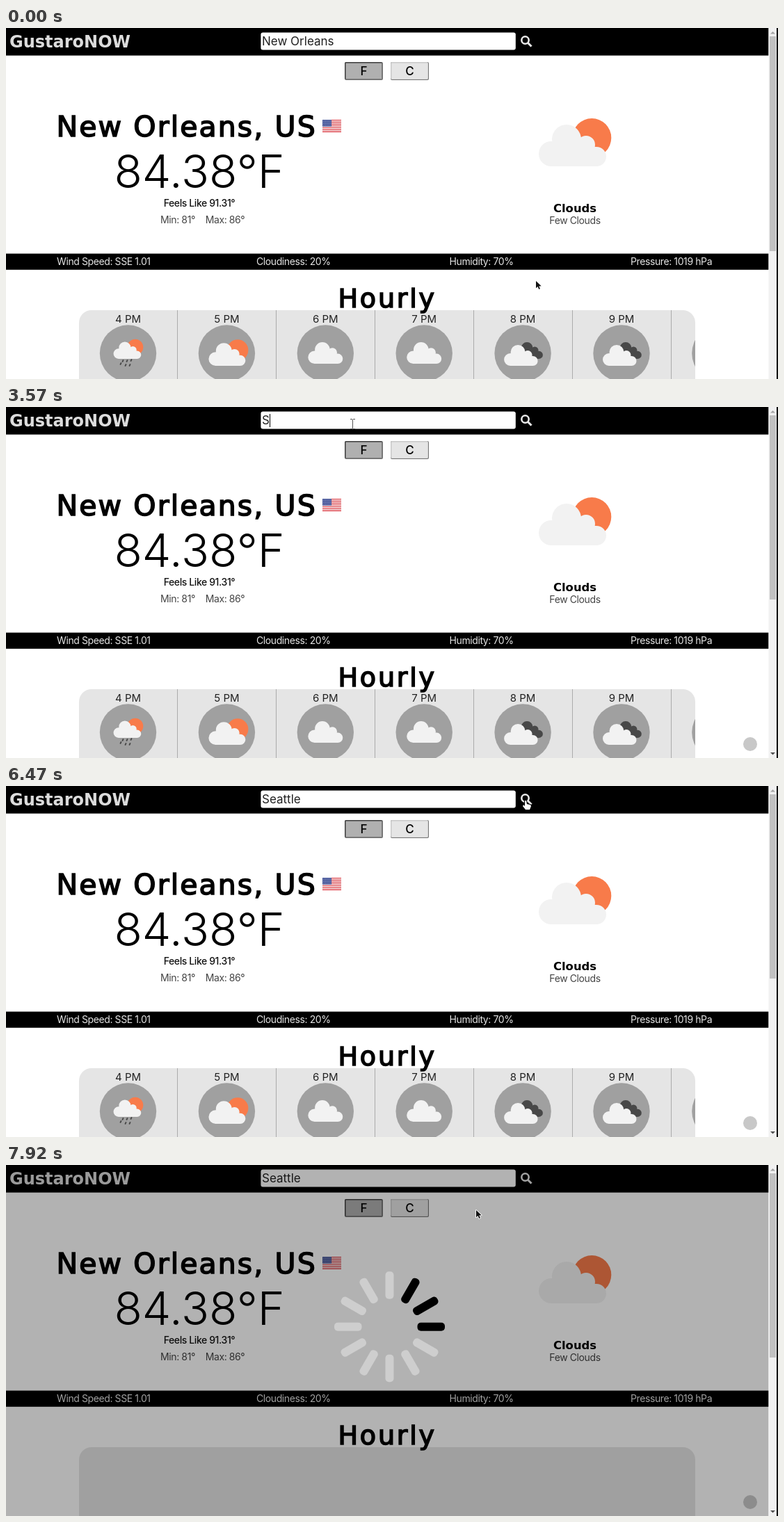
These frames come from a looping animation (1110x505 px, 8 s). An HTML page with a canvas:

```html
<!DOCTYPE html>
<html lang="en">
<head>
<meta charset="utf-8">
<title>Weather search</title>
<style>
html, body { margin: 0; width: 100%; height: 100%; overflow: hidden; background: #fff; }
canvas { display: block; }
</style>
</head>
<body>
<canvas id="stage" width="1110" height="505"></canvas>
<script>
const ctx = document.getElementById('stage').getContext('2d');
const LOOP = 8000;
const BODY = 'Inter, "Open Sans", sans-serif';
const DISPLAY = '"DejaVu Sans", sans-serif';
const ORANGE = '#f87b4a', CLOUD = '#f2f2f2', DARK = '#484848';
const PAGE_WIDTH = 1096.5;

const DIMMED = 6680;
const SPINNER_ON = 6780;
const POINTER_HIDDEN = [4750, 5530];
const CARET_ON = [[1860, 2250], [3570, 5340], [5830, 6360]];
const TYPING = [3570, 3640, 3850, 4240, 4440, 4650, 4840];

// Each move: start, end, step count, target x, target y, sag of the path
const START = [762, 364];
const MOVES = [
  [120, 890, 9, 465, 49, 0],
  [990, 1180, 3, 432, 31, 0],
  [1470, 1860, 5, 501, 24, 0],
  [2850, 2960, 2, 498, 24, 0],
  [5530, 6270, 9, 745, 25, 31],
  [6360, 6470, 2, 748, 21, 0],
  [7020, 7420, 5, 728, 45, 0],
  [7520, 7920, 5, 676, 65, 0]
];

const within = (t, [a, b]) => t >= a && t < b;

function rect(x, y, w, h, color) {
  ctx.fillStyle = color;
  ctx.fillRect(x, y, w, h);
}

function round(x, y, w, h, r, color) {
  ctx.fillStyle = color;
  ctx.beginPath();
  ctx.roundRect(x, y, w, h, r);
  ctx.fill();
}

function disc(x, y, r, color) {
  ctx.fillStyle = color;
  ctx.beginPath();
  ctx.arc(x, y, r, 0, Math.PI * 2);
  ctx.fill();
}

function line(x1, y1, x2, y2, color, width) {
  ctx.strokeStyle = color;
  ctx.lineWidth = width;
  ctx.beginPath();
  ctx.moveTo(x1, y1);
  ctx.lineTo(x2, y2);
  ctx.stroke();
}

function polygon(points, fill, stroke) {
  ctx.beginPath();
  points.forEach(([x, y]) => ctx.lineTo(x, y));
  ctx.closePath();
  if (stroke) {
    ctx.strokeStyle = stroke;
    ctx.lineWidth = 2;
    ctx.lineJoin = 'round';
    ctx.stroke();
  }
  ctx.fillStyle = fill;
  ctx.fill();
}

function text(str, x, y, size, { color = '#000', weight = 400, family = BODY, align = 'left', spacing = 0, outline = 0 } = {}) {
  ctx.font = `${weight} ${size}px ${family}`;
  ctx.letterSpacing = spacing + 'px';
  ctx.textAlign = align;
  ctx.fillStyle = color;
  ctx.fillText(str, x, y);
  if (outline) {
    ctx.strokeStyle = color;
    ctx.lineWidth = outline;
    ctx.strokeText(str, x, y);
  }
}

function textWidth(str, size) {
  ctx.font = `400 ${size}px ${BODY}`;
  ctx.letterSpacing = '0px';
  return ctx.measureText(str).width;
}

function cloud(left, base, scale, color) {
  ctx.save();
  ctx.translate(left, base);
  ctx.scale(scale, scale);
  ctx.fillStyle = color;
  ctx.beginPath();
  for (const [x, y, r] of [[18, -18, 18], [40, -39, 21], [68, -31, 13], [83, -14, 14]]) {
    ctx.moveTo(x + r, y);
    ctx.arc(x, y, r, 0, Math.PI * 2);
  }
  ctx.rect(18, -28, 65, 28);
  ctx.fill();
  ctx.restore();
}

function sunCloud(left, base, scale) {
  disc(left + 76.3 * scale, base - 41 * scale, 28 * scale, ORANGE);
  cloud(left, base, scale, CLOUD);
}

const icons = {
  rain(x) {
    sunCloud(x - 21, 476, 0.41);
    ctx.lineCap = 'round';
    for (const [dx, y] of [[-7, 478], [-1, 478], [5, 477], [-10, 482], [-3, 484], [3, 484]])
      line(x + dx, y, x + dx - 1, y + 2, DARK, 1.8);
    ctx.lineCap = 'butt';
  },
  sun: x => sunCloud(x - 26, 486, 0.546),
  cloud: x => cloud(x - 25, 483, 0.515, CLOUD),
  broken(x) {
    cloud(x - 10, 476, 0.4, DARK);
    cloud(x - 27, 486, 0.5, CLOUD);
  }
};

function drawHeader() {
  rect(0, 0, PAGE_WIDTH, 39.6, '#000');
  text('GustaroNOW', 5, 28, 24, { color: '#dcdcdc', weight: 700, family: DISPLAY });
  round(366.4, 6.4, 366.4, 25.2, 3, '#fff');
  ctx.strokeStyle = '#e8e8e8';
  ctx.lineWidth = 2.6;
  ctx.beginPath();
  ctx.arc(746.5, 17.5, 5.2, 0, Math.PI * 2);
  ctx.stroke();
  line(750, 21, 755.5, 26.5, '#e8e8e8', 3);
}

function drawInput(t) {
  const typed = TYPING.filter(at => t >= at).length;
  const value = typed ? 'Seattle'.slice(0, typed) : 'New Orleans';
  const end = 368 + textWidth(value, 17);
  text(value, 368, 25, 17, { color: '#222' });
  if (within(t, [2250, TYPING[0]])) {
    const from = t < 2450 ? 368 + textWidth('New ', 17) : 368;
    rect(from, 10, end - from, 19, '#1e90ff');
    ctx.save();
    ctx.beginPath();
    ctx.rect(from, 8, end - from, 23);
    ctx.clip();
    text(value, 368, 25, 17, { color: '#fff' });
    ctx.restore();
  }
  if (CARET_ON.some(span => within(t, span))) rect(Math.round(end), 10, 1, 19, '#000');
}

function drawButton(x, label, fill, topLeft, bottomRight) {
  round(x, 49, 55, 26, 2, bottomRight);
  round(x, 49, 54, 25, 2, topLeft);
  rect(x + 1.5, 50.5, 52, 23, fill);
  text(label, x + 27.5, 68, 17, { weight: 500, align: 'center' });
}

function drawFlag() {
  for (let i = 0; i < 13; i++) rect(455, 132 + i * 18 / 13, 27, 18 / 13, i % 2 ? '#f4e9e9' : '#dd3b43');
  rect(455, 132, 13, 9.7, '#4a5a9c');
  for (let i = 0; i < 12; i++) rect(456.5 + (i % 4) * 3, 133.5 + Math.floor(i / 4) * 3, 1, 1, '#cdd3e8');
}

function drawCurrent() {
  text('New Orleans, US', 72.5, 156, 41, { family: DISPLAY, spacing: 2.1, outline: 1.6 });
  drawFlag();
  text('84.38°F', 278, 230, 66, { weight: 350, align: 'center' });
  const small = { align: 'center', spacing: -0.4, color: '#444' };
  text('Feels Like 91.31°', 278, 257, 14, { ...small, color: '#111', weight: 500 });
  text('Min: 81°', 247, 281, 14, small);
  text('Max: 86°', 315, 281, 14, small);
  sunCloud(766, 199, 1);
  text('Clouds', 818, 265, 16.4, { weight: 700, family: DISPLAY, align: 'center' });
  text('Few Clouds', 818, 282, 14, small);

  rect(0, 324.6, PAGE_WIDTH, 23.2, '#000');
  const stat = { color: '#e5e5e5', spacing: -0.4 };
  text('Wind Speed: SSE 1.01', 73, 341, 14, stat);
  text('Cloudiness: 20%', 360, 341, 14, stat);
  text('Humidity: 70%', 637.5, 341, 14, stat);
  text('Pressure: 1019 hPa', 898, 341, 14, stat);
}

function drawHourly(filled) {
  round(105, 406, 886, 120, 18, '#e5e5e5');
  if (filled) {
    ctx.save();
    ctx.beginPath();
    ctx.rect(105, 406, 886, 99);
    ctx.clip();
    ['rain', 'sun', 'cloud', 'cloud', 'broken', 'broken', ''].forEach((kind, i) => {
      const x = 175.5 + i * 141.9;
      disc(x, 468, 40.7, '#a0a0a0');
      if (!kind) return;
      rect(Math.round(x + 70.5), 406, 1, 99, '#ababab');
      text(`${i + 4} PM`, x, 424, 15, { color: '#222', align: 'center' });
      icons[kind](x);
    });
    ctx.restore();
  }
  text('Hourly', 477.5, 402, 38, { family: DISPLAY, spacing: 2.8, outline: 1.6 });
}

function drawScrollbar(loaded) {
  rect(PAGE_WIDTH, 0, 1108 - PAGE_WIDTH, 505, '#f1f1f1');
  rect(1108, 0, 2, 505, '#000');
  rect(1098, 12, 9, loaded ? 265 : 309, '#c1c1c1');
  polygon([[1099, 8.5], [1102.5, 5], [1106, 8.5]], '#a3a3a3');
  if (loaded) polygon([[1099, 497], [1106, 497], [1102.5, 500.5]], '#505050');
}

function drawSpinner(t) {
  const tail = Math.floor((t - 7920) / 100) + 1;
  for (let i = 0; i < 12; i++) {
    const offset = ((i - tail) % 12 + 12) % 12;
    ctx.save();
    ctx.translate(551.5, 232.7);
    ctx.rotate(i * Math.PI / 6);
    round(-6, -79.5, 12, 39.5, 5, offset < 3 ? '#000' : '#cecece');
    ctx.restore();
  }
}

function pointerAt(t) {
  let [x, y] = START;
  for (const [start, end, steps, toX, toY, sag] of MOVES) {
    if (t < start) break;
    const step = Math.floor((t - start) / (end - start) * (steps - 1) + 1e-6) + 1;
    const p = Math.min(1, step / steps);
    x += (toX - x) * p;
    y += (toY - y) * p + sag * Math.sin(Math.PI * p);
  }
  return [x, y];
}

function drawPointer(t) {
  if (within(t, POINTER_HIDDEN)) return;
  const [x, y] = pointerAt(t);
  ctx.save();
  ctx.translate(Math.round(x), Math.round(y));
  if (x > 366 && x < 733 && y < 30) {
    rect(0, -6, 1, 13, '#555');
    rect(-3, -7, 3, 1, '#555');
    rect(1, -7, 3, 1, '#555');
    rect(-3, 7, 3, 1, '#555');
    rect(1, 7, 3, 1, '#555');
  } else if (x > 738 && y < 32) {
    polygon([[-2, 0], [0, 0], [1, 5], [6, 6], [7, 8], [5, 13], [-1, 13], [-5, 8], [-4, 6], [-2, 8]], '#fff', '#000');
  } else {
    ctx.scale(0.85, 0.85);
    polygon([[0, 0], [0, 12], [3, 9.5], [5, 14], [7, 13], [5, 8.8], [9, 8.5]], '#111', '#fff');
  }
  ctx.restore();
}

function draw(t) {
  const loaded = t >= 120;
  const dimmed = t >= DIMMED;
  rect(0, 0, 1110, 505, '#fff');
  drawHeader();
  drawInput(t);
  drawButton(487, 'F', '#b0b0b0', '#3c3c3c', '#777');
  drawButton(553, 'C', '#e5e5e5', '#c8c8c8', '#777');
  drawCurrent();
  drawHourly(!dimmed);
  if (loaded) disc(1070, 485, 10, '#c8c8c8');
  if (dimmed) rect(0, 0, PAGE_WIDTH, 505, 'rgba(0, 0, 0, 0.3)');
  if (t >= SPINNER_ON) drawSpinner(t);
  drawScrollbar(loaded);
  drawPointer(t);
}

function tick() {
  draw(performance.now() % LOOP);
  requestAnimationFrame(tick);
}
tick();
</script>
</body>
</html>
```
